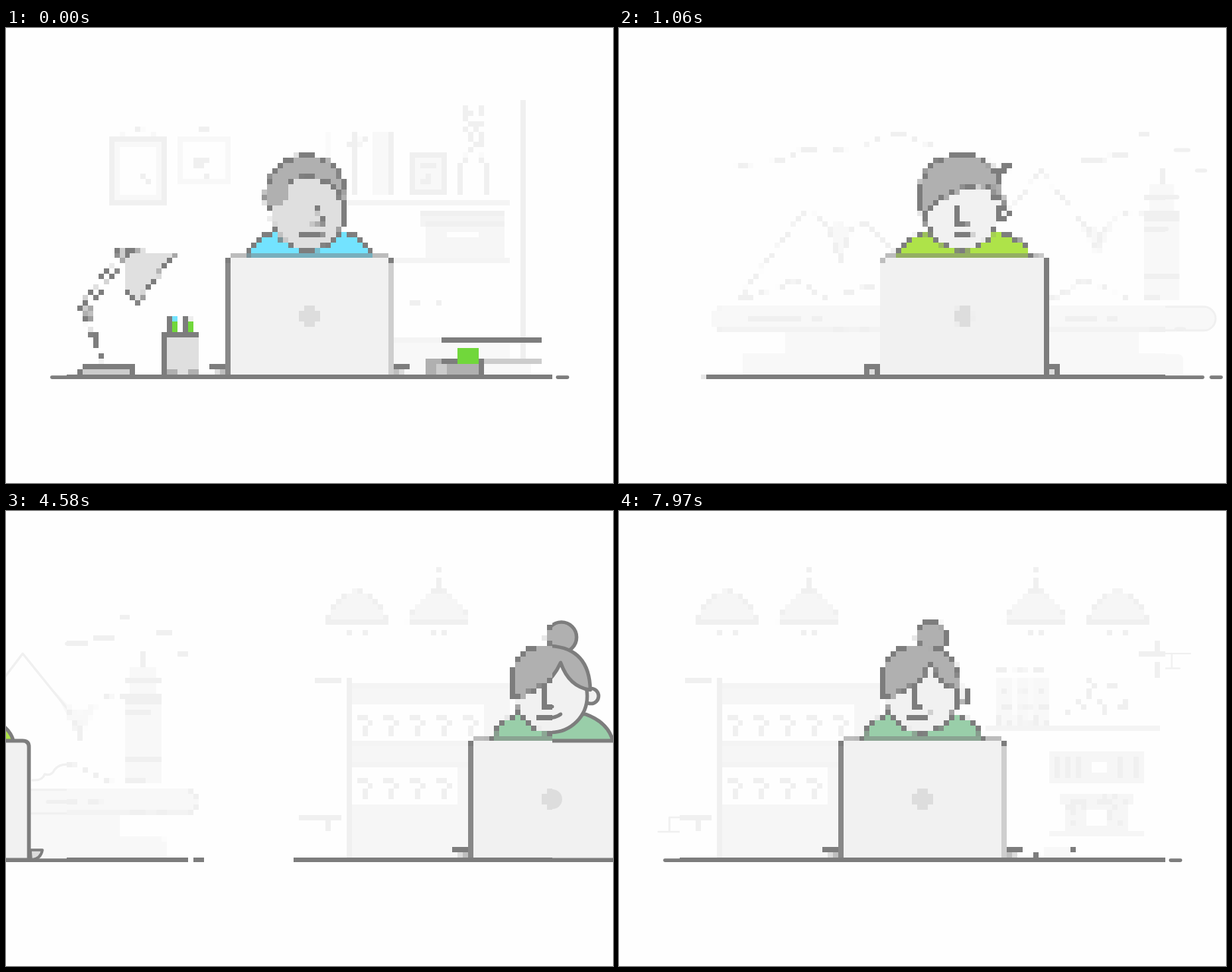
An HTML page with a canvas that plays this animation: 800x600 px, repeating every 8000 ms.

```html
<!DOCTYPE html>
<html lang="en">
<head>
<meta charset="utf-8">
<title>Working anywhere</title>
<style>
html, body { margin: 0; width: 100%; height: 100%; overflow: hidden; background: #fefefe; }
canvas { display: block; }
</style>
</head>
<body>
<canvas id="stage" width="800" height="600"></canvas>
<script>
const WHITE = '#fefefe', FILL = '#f8f8f8', SOFT = '#f4f4f4', LINE = '#f0f0f0', DARK = '#7d7d7d';
const HAIR = '#b0b0b0', PALE = '#f1f1f1', SKIN = '#dfdfdf', GREY = '#cccccc';
const LIME = '#71d73b', SKY = '#73e3ff', ICE = '#a8edff';
const CELL = 640 / 92;

const makeCanvas = (w, h) => Object.assign(document.createElement('canvas'), { width: w, height: h });
const ctx = document.getElementById('stage').getContext('2d');
const full = makeCanvas(800, 600), g = full.getContext('2d');
const small = makeCanvas(92, 69), mini = small.getContext('2d');
ctx.imageSmoothingEnabled = mini.imageSmoothingEnabled = false;
g.lineCap = g.lineJoin = 'round';

function slab(color, x, y, w, h) {
  g.fillStyle = color;
  g.fillRect(x, y, w, h);
}

function path(d, fill, stroke = DARK, width = 4.7) {
  const p = new Path2D(d);
  if (fill) { g.fillStyle = fill; g.fill(p); }
  if (stroke) { g.strokeStyle = stroke; g.lineWidth = width; g.stroke(p); }
}

const thin = (d, fill, width = 2.6) => path(d, fill, LINE, width);
const circle = (x, y, r) => `M${x - r},${y}a${r},${r} 0 1 1 ${2 * r},0a${r},${r} 0 1 1 ${-2 * r},0z`;
const rect = (x, y, w, h) => `M${x},${y}h${w}v${h}h${-w}z`;

function noise(i, seed) {
  const v = Math.sin(i * 12.9898 + seed * 78.233) * 43758.5453;
  return v - Math.floor(v);
}

// Faint details: about half of the mosaic cells in an area
function specks(x, y, cols, rows, seed, density = .45) {
  for (let i = 0; i < cols * rows; i++) {
    if (noise(i, seed) < density) slab(LINE, x + i % cols * CELL, y + Math.floor(i / cols) * CELL, CELL, CELL);
  }
}

function shirt(color, half) {
  const l = 400 - half, r = 400 + half;
  path(`M${l},304Q${l + 6},279 356,268L444,268Q${r - 6},279 ${r},304Z`, color);
}

function laptop() {
  path('M288,447H272Q274,459 287,460ZM512,447H528Q526,459 513,460Z', '#dcdcdc', DARK, 3.6);
  path('M290.4,460V311Q290.4,303 298,303H502Q510.2,303 510.2,311V460Z', PALE, DARK, 5);
  path(circle(400, 380, 13), '#dddddd', null);
}

const office = {
  back() {
    // pictures on the wall
    thin(rect(140, 147, 68, 83), null, 8);
    path(rect(147, 154, 56, 69), WHITE, FILL, 7);
    path(rect(229, 147, 62, 56), null, FILL, 6);
    thin('M151,140L181,132L196,140M240,140L261,132L282,140', null, 2);
    specks(177.4, 192.2, 3, 3, 1);
    specks(247, 171.3, 4, 4, 5);
    // binders
    slab(FILL, 480, 137, 31, 83);
    thin('M426,136V230M443,119V229H480M443,221H480M477,136V221');
    for (const x of [443, 460]) thin(`M${x},221V136h17` + circle(x + 9, 149.5, 4.5));
    slab(LINE, 504, 137, 7, 83);
    // shelves
    for (const y of [227, 303, 408]) slab(SOFT, 450, y, 214, 7);
    slab(FILL, 450, 415, 214, 43);
    for (const x of [664.7, 682]) thin(`M${x},97V458`);
    thin('M554.5,317V408M535,362h8M568,362h5');
    path(rect(536, 168, 41, 48), FILL, LINE, 6);
    specks(546, 178.3, 3, 4, 3);
    // plant in a vase
    specks(601.7, 101.7, 4, 9, 4);
    thin('M609,167L598,185V216M623,167L634,185V216', null, 4);
    // storage box
    slab('#f6f6f6', 553, 262, 104, 41);
    slab(SOFT, 546, 241, 111, 21);
    thin('M549,244H654M556,258H654', null, 5);
    path('M585,272h34', null, WHITE, 6);
  },
  person() {
    shirt(SKY, 84);
    path('M344.8,238A53,53 0 1 1 446.2,238Z', HAIR);
    path(circle(398, 244, 48), SKIN, null);
    path('M353,213Q361,202 370,202V228Q364,236 351,236Z', HAIR, null);
    path('M350,250A48,48 0 1 0 374,203');
    path('M409,234L416,251Q418,260 410,261H402M386,273Q404,276 418,270');
  },
  items() {
    // lamp
    path('M129,443L103,382M121,420L112,380', null, DARK, 3);
    path('M101,363L145,304M112,366L155,308', null, DARK, 3);
    path(circle(105, 370, 8) + circle(153, 298, 8), GREY, DARK, 2.6);
    path('M157,306L166,295L222,298L174,361L157,347Z', '#e0e0e0', DARK, 4);
    path('M98,456Q98,446 104,446H167V456Z', GREY, DARK, 3.8);
    // pencil cup
    for (const [x, color] of [[215, SKY], [236, '#eeeeee']]) {
      slab(color, x + 3, 380, 7, 14);
      slab(LIME, x + 3, 390, 7, 12);
      path(`M${x},383V402`, null, DARK, 6);
    }
    slab(SKIN, 205, 401, 49, 57);
    path('M208.5,457V404.5H251', null, DARK, 6);
    path('M216,454H223M243,454H251', null, HAIR, 6);
    // books and mug
    slab(GREY, 630, 436, 76, 7);
    slab(FILL, 630, 443, 62, 15);
    slab(DARK, 574, 408, 132, 7);
    slab(HAIR, 553, 436, 77, 22);
    slab(GREY, 567, 443, 14, 15);
    path('M578,440H592M627,440V456', null, DARK, 6);
    slab(LIME, 595, 422, 28, 21);
  }
};

const coast = {
  back() {
    // clouds
    thin('M102,182L140,179L163,175L188,161H207M234,178H272', null, 3.5);
    thin('M232,161L272,157L285,147L310,141Q334,139 338,152L357,153.5', null, 3);
    thin('M560,175H578L603,169L618,167M633,139.5H642M680,161H697M708,188H719', null, 5);
    // mountains
    path('M220,262L236,257L256,264L240,304Z', FILL, null);
    path('M543,236L567,262L580,266L604,248L577,300Z', FILL, null);
    thin('M104,358L193,238L222,262L238,308L252,264L270,257L312,298', null, 3.5);
    thin('M455,250L502,188L565,266L577,300L580,274L608,246L630,240L640,254', null, 3);
    // bushes
    thin('M104,355H118L138,347L160,344Q165,332 178,334Q192,336 200,347L220,357M236,353L262,345L288,340', null, 3.5);
    thin('M515,355Q528,356 531,347Q540,350 544,341Q552,332 565,335L592,345Q602,355 638,361', null, 3);
    // shore
    slab(FILL, 167, 399, 466, 33);
    path('M110,458V438Q110,430 118,430H682Q690,430 690,438V458Z', FILL, null);
    path('M83,367.5H717a15.7,15.7 0 0 1 0,31.4H83a15.7,15.7 0 0 1 0,-31.4z', FILL, LINE, 2.6);
    for (const x of [117, 535]) thin(`M${x},383.5h${x < 400 ? 66 : 38}m18,0h12M${x + 112},397h14m20,0h10`, null, 5);
    // lighthouse
    slab(FILL, 644, 206, 34, 35);
    slab(FILL, 637, 241, 48, 118);
    slab(LINE, 637, 241, 48, 14);
    slab(LINE, 637, 324, 48, 7);
    thin('M660.5,188V206M640,223H682M640,265H668M640,353H660', null, 6);
  },
  person() {
    shirt('#aee349', 90);
    path(circle(453, 244, 8), PALE, DARK, 4);
    path(circle(398, 244, 48), PALE);
    path('M441,190L460,182L458,188Z');
    path('M347,251Q339,217 347,198Q360,168.6 400,168.6Q430,169 442,190Q452,200 452,238Q446,205 420,207Q370,214 347,251Z', HAIR);
    path('M391,238V258H404M388,272Q399,275 411,271');
  },
  items() {
    // bottle
    path('M206,340V346Q192.5,362 192.5,375L195,460H235V376Q235,362 226,348V340Z', '#fafafa', DARK, 2.4);
    path(rect(206.5, 331, 19, 7.5), LIME, DARK, 3);
    slab('#a6e88f', 198, 386, 35, 31);
    path('M200,386.6H232M200,418.4H231', null, DARK, 3.6);
    path('M208,432.5H223', null, '#dddddd', 5);
    // iced drink
    path('M556,369L571,377V394M556.5,398V403', null, DARK, 4.5);
    path('M558,393H604L598,460H563Z', ICE, DARK, 3.5);
    path('M571,425H584L578,433M591,411V412', null, SKY, 6);
    path(rect(583, 431, 9, 9) + rect(570, 446, 8, 9), '#e1f9ff', '#e1f9ff', 3);
  }
};

const cafe = {
  back() {
    // hanging lamps
    for (const x of [142, 250, 549, 657]) {
      path(`M${x - 40},147Q${x - 34},122 ${x - 10},108L${x},102L${x + 10},108Q${x + 34},122 ${x + 40},147Z`, '#f6f6f6', LINE, 2.5);
      thin(`M${x - 37},146.5h74M${x - 9},160v1m19,0v-1`, null, 6.5);
      if (x > 200 && x < 600) thin(`M${x},77v1m0,13v15`, null, 6);
    }
    // counter with cups
    slab('#f6f6f6', 136, 234, 209, 224);
    slab(SOFT, 136, 227, 209, 7);
    slab(LINE, 129, 220, 7, 238);
    for (const [y, cups] of [[255, 5], [338, 4]]) {
      slab(WHITE, 136, y, 35 * cups - 1, 49);
      for (let i = 0; i < cups; i++) specks(142.6 + 35 * i, y + 13.9, 3, 4, 7, .4);
      slab(SOFT, 136, y === 255 ? 303 : 332, 150, 7);
    }
    // side table
    thin('M90,223.5h29M83,404.5h36M105,408V422', null, 6);
    thin('M66.5,422V404H82M52,423H122');
    // shelf with jars
    slab(SOFT, 480, 283, 233, 7);
    for (const x of [497.4, 521.7, 546]) {
      slab(FILL, x, 220, 21, 63);
      specks(x, 206.1, 3, 11, 2, .3);
    }
    specks(587.8, 220, 12, 8, 9, .2);
    // coffee machine
    for (const [x, y, h] of [[567, 317, 42], [581, 373, 14], [588, 387, 35], [567, 422, 7]]) {
      slab('#f6f6f6', x, y, 2 * (629.5 - x), h);
    }
    for (const x of [577, 591, 605, 661, 682]) thin(`M${x},327v20`, null, 6);
    specks(587.8, 373, 12, 6, 3, .25);
    slab(WHITE, 616, 394, 27, 21);
    slab(WHITE, 623, 331, 20, 14);
    // wall tap
    thin('M688,188H717M709.5,174V188M709.5,202V217', null, 6);
    thin('M719,188H753M728.5,188V207M719,207.5H739', null, 2.2);
  },
  person() {
    shirt('#99cea9', 80);
    path(circle(412, 166.5, 20), HAIR);
    path(circle(451, 244, 10), PALE);
    path(circle(398, 244, 48), PALE);
    path('M346,245V225Q349,178.5 398,178Q449,181 450,236Q422,232 411,200Q393,240 346,245Z', HAIR);
    path('M390,236V258H400M381,271Q400,276 411,268');
  },
  items() {
    // sugar bowl
    slab('#dddddd', 205, 429, 42, 29);
    slab(GREY, 198, 443, 42, 15);
    path('M208,404L222,420M201,425.5H237V439.5H201Z', null, DARK, 5.5);
    // takeaway cup
    slab(FILL, 560, 387, 35, 14);
    slab(SKIN, 553, 401, 42, 57);
    path('M549.7,397v1M598.4,390v1M598.4,404v8M556.5,426V454H592M560,432H578V440', null, DARK, 6.5);
    slab(LIME, 567, 415, 21, 21);
  }
};

const HIDDEN = 300;

function drawScene(scene, x, drop) {
  g.save();
  g.translate(x, 0);
  scene.back();
  scene.person();
  if (drop < HIDDEN) {
    g.save();
    g.beginPath();
    g.rect(0, 0, 800, 458);
    g.clip();
    g.translate(0, drop);
    scene.items();
    g.restore();
  }
  laptop();
  path('M60.5,460.6H715.7M727,460.6H740', null, DARK, 4.7);
  g.restore();
}

// Each move: start, sinking speed of the props, pace of the slide
const moves = [
  { scene: office, next: coast, at: 500, sink: 28, pace: 1 },
  { scene: coast, next: cafe, at: 4220, sink: 52, pace: .826 },
  { scene: cafe, next: office, at: 7940, sink: 28, pace: 1 }
];

// Two quick steps to sink, six slow ones to slide, two quick ones to rise
function stepAt(ms) {
  if (ms < 60) return Math.floor(ms / 30);
  if (ms < 660) return 2 + Math.floor((ms - 60) / 100);
  return Math.min(10, 8 + Math.floor((ms - 660) / 30));
}

function draw(t) {
  slab(WHITE, 0, 0, 800, 600);
  const move = moves.findLast(m => t >= m.at);
  if (!move) {
    drawScene(office, 0, 0);
  } else {
    const k = stepAt(t - move.at);
    const p = Math.min(1, Math.max(0, (k - 2) / 6)) ** move.pace;
    const shift = 400 * (1 - Math.cos(Math.PI * p));
    if (k < 8) drawScene(move.scene, -shift, k < 2 ? move.sink * (k + 1) : HIDDEN);
    if (k > 2) drawScene(move.next, 800 - shift, k < 8 ? HIDDEN : 30 * (10 - k));
  }
  // mosaic over the middle of the stage
  mini.drawImage(full, 80, 60.3, 640, 480, 0, 0, 92, 69);
  ctx.drawImage(full, 0, 0);
  ctx.drawImage(small, 80, 60, 640, 480);
}

function tick() {
  draw(performance.now() % 8000);
  requestAnimationFrame(tick);
}
tick();
</script>
</body>
</html>
```
